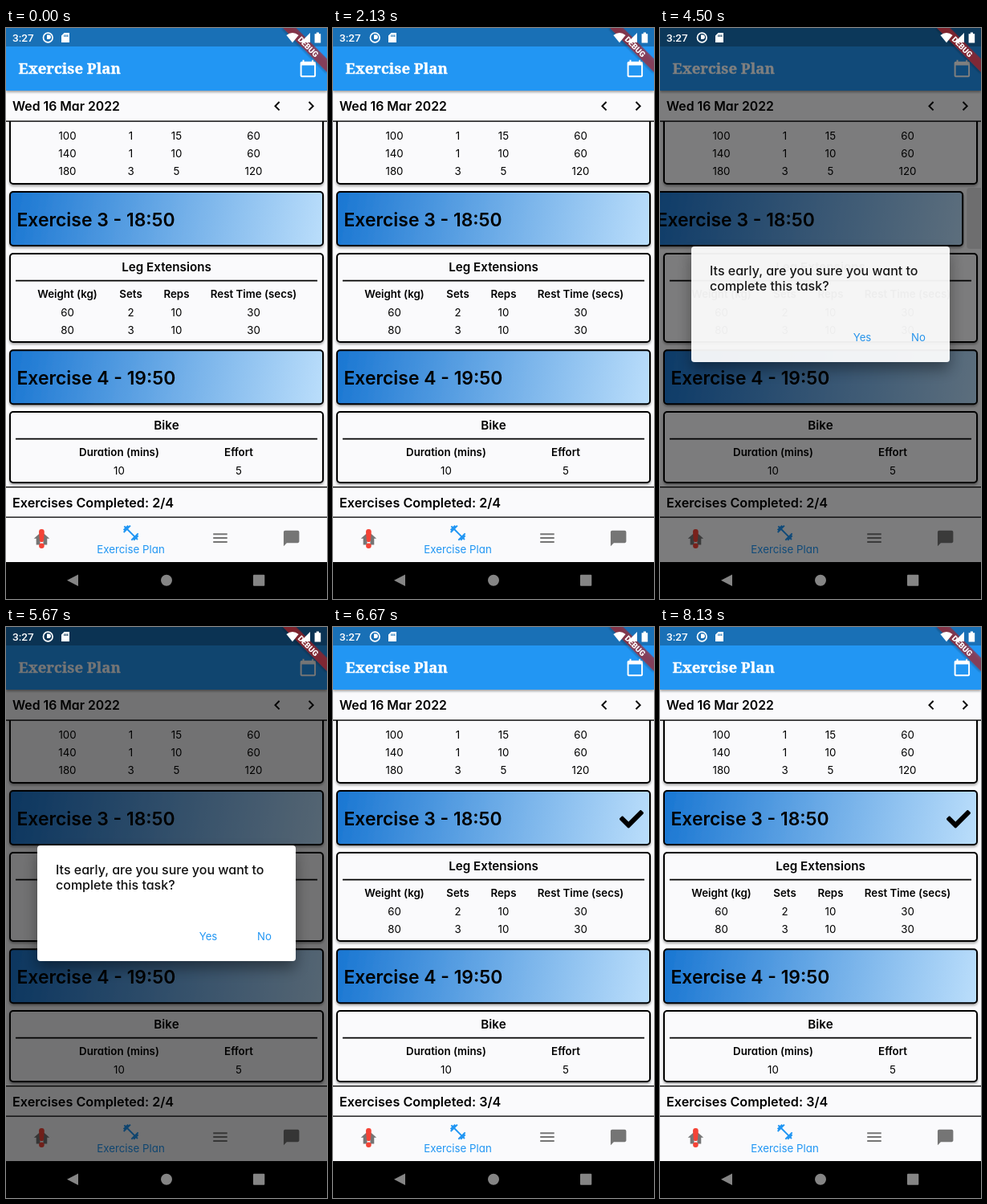
Recreate the animation shown at these times as an HTML page. Size 400x711 px, loop 8210 ms.

```html
<!DOCTYPE html>
<html lang="en">
<head>
<meta charset="utf-8">
<title>Exercise Plan</title>
<style>
  html, body { margin: 0; width: 100%; height: 100%; overflow: hidden; background: #000; }
  svg { display: block; width: 100vw; height: 100vh; }
  text { font-family: Inter, "Open Sans", sans-serif; font-feature-settings: "cv11"; }
  .card { fill: #fafafc; stroke: #000; stroke-width: 2; filter: url(#soft); }
  .tile { stroke: #000; stroke-width: 2; filter: url(#soft); }
  .rule { stroke: #000; stroke-width: 1.7; }
</style>
</head>
<body>
<svg viewBox="0 0 400 711" preserveAspectRatio="none">
  <defs>
    <filter id="soft" x="-5%" y="-15%" width="110%" height="135%">
      <feDropShadow dx="0" dy="2" stdDeviation="1.5" flood-color="#000" flood-opacity=".35"/>
    </filter>
    <filter id="deep" x="-20%" y="-30%" width="140%" height="170%">
      <feDropShadow dx="0" dy="9" stdDeviation="9" flood-color="#000" flood-opacity=".4"/>
    </filter>
    <linearGradient id="blue" gradientUnits="userSpaceOnUse" x1="5" y1="0" x2="395" y2="67">
      <stop offset="0" stop-color="#1976d2"/>
      <stop offset="1" stop-color="#bbdefb"/>
    </linearGradient>
    <clipPath id="list"><rect y="116" width="400" height="455"/></clipPath>
    <clipPath id="paneBox"><rect x="268" y="199" width="132" height="76" rx="4"/></clipPath>
    <clipPath id="yesBox"><rect x="221" y="367" width="62" height="36" rx="4"/></clipPath>
    <path id="check" d="M173.9 439.4l-166.4-166.4c-10-10-10-26.2 0-36.2l36.2-36.2c10-10 26.2-10 36.2 0L192 312.7 432.1 72.6c10-10 26.2-10 36.2 0l36.2 36.2c10 10 10 26.2 0 36.2l-294.4 294.4c-10 10-26.2 10-36.2 0z"/>
  </defs>

  <rect width="400" height="665" fill="#fafafc"/>
  <g id="body" clip-path="url(#list)"></g>

  <rect y="78" width="400" height="38" fill="#fafafc"/>
  <rect y="23" width="400" height="55" fill="#2196f3" filter="url(#soft)"/>
  <rect width="400" height="23" fill="#1970b6"/>
  <rect y="115.4" width="400" height="1.4"/>
  <rect y="571" width="400" height="38" fill="#fafafc"/>
  <rect y="571" width="400" height="1.3"/>
  <rect y="608.5" width="400" height="1.3"/>
  <g id="chrome"></g>
  <g fill="#f44336">
    <path d="M41 627.5a3.4 3.4 0 0 1 6.8 0l-.8 10a2.6 2.6 0 0 1-5.2 0z"/>
    <circle cx="44.4" cy="644.8" r="3.3"/>
  </g>

  <rect id="shade" width="400" height="665"/>
  <g id="dialog">
    <rect x="39" y="272" width="322" height="144" rx="4" fill="#fff" filter="url(#deep)"/>
    <circle id="ripple" cx="246" cy="385" fill="#2196f3" clip-path="url(#yesBox)"/>
  </g>

  <g transform="translate(400 0) rotate(45)">
    <rect x="-39" y="27.2" width="78" height="11.7" fill="#b71c1c" fill-opacity=".63" filter="url(#soft)"/>
    <text y="36.7" font-size="9.9" font-weight="900" fill="#fff" text-anchor="middle" style="font-family:Roboto,sans-serif">DEBUG</text>
  </g>
  <g id="status" fill="#fff">
    <circle cx="52.3" cy="12" r="5.8" fill="none" stroke="#fff" stroke-width="1.7"/>
    <path d="M51 8.5h2.2a2.7 2.7 0 0 1 0 5.4H51z"/>
    <path d="M72.6 6H79v12H69V9.6zM72.3 8.5v2.5h1.1V8.5zm2 0v2.5h1.1V8.5zm2 0v2.5h1.1V8.5z" fill-rule="evenodd"/>
    <path d="M357 18.2L349.4 9Q357 3 364.6 9z"/>
    <path d="M379 6v12h-12z"/>
    <path d="M384.6 7.2h2.2V5.6h3.2v1.6h2.2V18.4h-7.6z"/>
  </g>

  <rect y="665" width="400" height="46"/>
  <g fill="#858585">
    <path d="M90 680.5v14.5l-14-7.2z"/>
    <circle cx="200" cy="687.7" r="7"/>
    <rect x="308" y="680.8" width="14.3" height="14" rx="1"/>
  </g>
</svg>
<script>
const $ = id => document.getElementById(id);
const NS = "http://www.w3.org/2000/svg";
const LOOP = 8210, PANE = 132, BLUE = "#2196f3", GREY = "#757575";

function add(parent, tag, attrs, label) {
  const el = document.createElementNS(NS, tag);
  for (const k in attrs) el.setAttribute(k, attrs[k]);
  if (label !== undefined) el.textContent = label;
  return parent.appendChild(el);
}

// y is the middle of the capitals
function write(parent, label, x, y, size, weight = 400, fill = "#000", anchor = "middle") {
  return add(parent, "text", {
    x, y: y + size * 0.36, "font-size": size, "font-weight": weight, fill, "text-anchor": anchor
  }, label);
}

function icon(x, y, fill, d) {
  add($("chrome"), "path", { d, fill, transform: `translate(${x} ${y}) scale(.972)` });
}

function card(y, h) {
  add(body, "rect", { class: "card", x: 5, y, width: 390, height: h, rx: 4 });
}

function heading(label, y) {
  write(body, label, 200, y, 15.2, 600);
  add(body, "path", { class: "rule", d: `M12 ${y + 16.6}H388` });
}

function row(cells, xs, y, weight) {
  cells.forEach((c, i) => write(body, c, xs[i], y, 13.3, weight));
}

function tile(label, y) {
  const g = add(body, "g", {});
  const box = add(g, "g", { transform: `translate(0 ${y})` });
  add(box, "rect", { class: "tile", x: 5, y: 0, width: 390, height: 67, rx: 4, fill: "url(#blue)" });
  write(box, label, 13.5, 34.5, 22.9, 600, "#000", "start");
  return g;
}

const body = $("body");
const cols = [76.5, 155.5, 212.5, 308.5];

card(60, 134);
row(["100", "1", "15", "60"], cols, 134);
row(["140", "1", "10", "60"], cols, 156);
row(["180", "3", "5", "120"], cols, 178.5);

const pane = add(body, "g", {});
const tint = add(pane, "rect", { x: 268, y: 199, width: PANE, height: 76, rx: 4 });
const splash = add(add(pane, "g", { "clip-path": "url(#paneBox)" }), "circle", { cx: 334, cy: 237, opacity: 0.06 });
add(pane, "use", { href: "#check", transform: "translate(322 208) scale(.047)" });
write(pane, "Complete?", 333.5, 258.5, 13.6);

const slider = tile("Exercise 3 - 18:50", 204);
const done = add(slider, "use", { href: "#check", transform: "translate(357 224.2) scale(.0586)" });

card(281, 110);
heading("Leg Extensions", 298);
row(["Weight (kg)", "Sets", "Reps", "Rest Time (secs)"], cols, 331.5, 600);
row(["60", "2", "10", "30"], cols, 354);
row(["80", "3", "10", "30"], cols, 376.5);

tile("Exercise 4 - 19:50", 401.3);

card(478, 88);
heading("Bike", 495);
row(["Duration (mins)", "Effort"], [141, 290], 528.5, 600);
row(["10", "5"], [141, 290], 551);

const chrome = $("chrome");
const title = write(chrome, "Exercise Plan", 15.5, 50.3, 18.6, 800, "#fff", "start");
title.style.fontFamily = '"Noto Serif", serif';
title.setAttribute("stroke", "#fff");
title.setAttribute("stroke-width", 0.4);
write(chrome, "Wed 16 Mar 2022", 8, 97.5, 15.8, 600, "#000", "start");
const count = write(chrome, "", 8, 591, 16.2, 600, "#000", "start");
write(chrome, "Exercise Plan", 155.5, 649, 13.3, 400, BLUE);

icon(364.7, 38.8, "#fff", "M20 3h-1V1h-2v2H7V1H5v2H4c-1.1 0-2 .9-2 2v16c0 1.1.9 2 2 2h16c1.1 0 2-.9 2-2V5c0-1.1-.9-2-2-2zm0 18H4V8h16v13z");
icon(326.3, 85.5, "#000", "M15.41 7.41L14 6l-6 6 6 6 1.41-1.41L10.83 12z");
icon(368.5, 85.5, "#000", "M10 6L8.59 7.41 13.17 12l-4.58 4.58L10 18l6-6z");
icon(32.8, 624, GREY, "M10 20v-6h4v6h5v-8h3L12 3 2 12h3v8z");
icon(144, 617, BLUE, "M20.57 14.86L22 13.43 20.57 12 17 15.57 8.43 7 12 3.43 10.57 2 9.14 3.43 7.71 2 5.57 4.14 4.14 2.71 2.71 4.14l1.43 1.43L2 7.71l1.43 1.43L2 10.57 3.43 12 7 8.43 15.57 17 12 20.57 13.43 22l1.43-1.43L16.29 22l2.14-2.14 1.43 1.43 1.43-1.43-1.43-1.43L22 16.29z");
icon(255.3, 623.4, GREY, "M3 18h18v-2H3v2zm0-5h18v-2H3v2zm0-7v2h18V6H3z");
icon(344, 623.8, GREY, "M20 2H4c-1.1 0-2 .9-2 2v18l4-4h14c1.1 0 2-.9 2-2V4c0-1.1-.9-2-2-2z");

const dialog = $("dialog");
write(dialog, "Its early, are you sure you want to", 62, 302, 16, 500, "#111", "start");
write(dialog, "complete this task?", 62, 321.5, 16, 500, "#111", "start");
write(dialog, "Yes", 252, 385, 13.2, 400, BLUE);
write(dialog, "No", 322, 385, 13.2, 400, BLUE);

write($("status"), "3:27", 8, 12.3, 13.6, 500, "#fff", "start").style.fontFamily = "Roboto, sans-serif";

const holds = [[3000, 3210], [4250, 4420], [4420, 4500], [4500, 4670], [6500, 6670]];

const ramp = (t, a, b) => Math.min(1, Math.max(0, (t - a) / (b - a)));
const smooth = p => p * p * (3 - 2 * p);
const easeOut = p => 1 - (1 - p) * (1 - p);

function draw(now) {
  let t = now % LOOP;
  const hold = holds.find(([a, b]) => t >= a && t < b);
  if (hold) t = hold[0];

  const shift = PANE * (smooth(ramp(t, 2590, 3000)) - smooth(ramp(t, 4300, 4560)));
  slider.setAttribute("transform", `translate(${-shift} 0)`);
  pane.setAttribute("transform", `translate(${PANE - shift} 0)`);
  pane.setAttribute("visibility", shift > 0.01 ? "visible" : "hidden");

  const press = ramp(t, 4050, 4270);
  tint.setAttribute("opacity", 0.06 * press);
  splash.setAttribute("r", 85 * press);

  const fade = easeOut(ramp(t, 4390, 4540) - ramp(t, 6452, 6602));
  $("shade").setAttribute("opacity", 0.54 * fade);
  dialog.setAttribute("opacity", fade);

  const tap = ramp(t, 6270, 6500);
  $("ripple").setAttribute("r", tap ? 8 + 13 * tap : 0);
  $("ripple").setAttribute("opacity", 0.14 * ramp(t, 6270, 6340));

  const finished = t >= 6670;
  done.setAttribute("visibility", finished ? "visible" : "hidden");
  count.textContent = `Exercises Completed: ${finished ? 3 : 2}/4`;
}

const start = performance.now();
function tick() {
  draw(performance.now() - start);
  requestAnimationFrame(tick);
}
tick();
</script>
</body>
</html>
```
